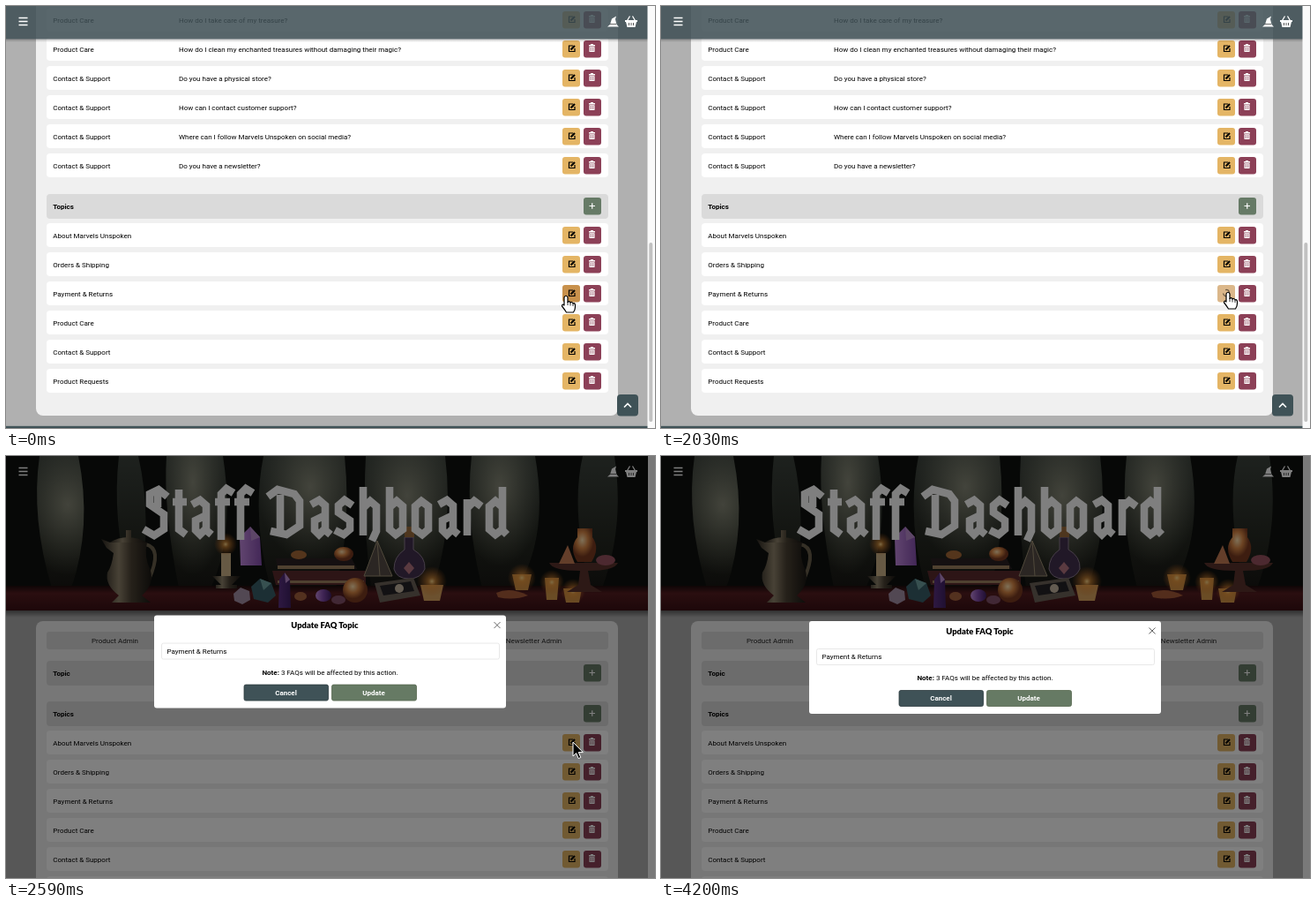
Animation, 736 px wide and 478 px high, one loop 4970 ms. Source, as an HTML page:

```html
<!DOCTYPE html>
<html lang="en">
<head>
<meta charset="utf-8">
<title>Staff Dashboard</title>
<style>
  html, body { margin: 0; height: 100%; overflow: hidden; background: #b0b0b0; }
  svg { display: block; width: 736px; height: 478px; font: 8px Roboto, sans-serif; }
  .b { font-weight: 700; }
  .mid { text-anchor: middle; }
  .title { fill: none; stroke: #fff; stroke-width: 8.6; stroke-miterlimit: 3; }
</style>
</head>
<body>
<svg viewBox="0 0 736 478">
  <defs>
    <radialGradient id="haze"><stop stop-color="#a3a48f" stop-opacity=".75"/><stop offset="1" stop-color="#8b8e7c" stop-opacity="0"/></radialGradient>
    <radialGradient id="flame"><stop stop-color="#ffd98a"/><stop offset=".25" stop-color="#f09a3c" stop-opacity=".7"/><stop offset="1" stop-color="#d06a20" stop-opacity="0"/></radialGradient>
    <radialGradient id="amber" cx=".4" cy=".35"><stop stop-color="#ffe2b0"/><stop offset=".5" stop-color="#d98745"/><stop offset="1" stop-color="#7a3a20"/></radialGradient>
    <linearGradient id="violet"><stop stop-color="#c48be0"/><stop offset=".5" stop-color="#7d46a8"/><stop offset="1" stop-color="#3f2063"/></linearGradient>
    <linearGradient id="brass"><stop stop-color="#2c2720"/><stop offset=".35" stop-color="#91846c"/><stop offset=".6" stop-color="#4b4234"/><stop offset="1" stop-color="#1c1814"/></linearGradient>
    <linearGradient id="wood" x2="0" y2="1"><stop stop-color="#1d0b0c"/><stop offset=".3" stop-color="#551d20"/><stop offset="1" stop-color="#3a0f14"/></linearGradient>
    <linearGradient id="forest" x2="0" y2="1"><stop stop-color="#3c433d"/><stop offset=".6" stop-color="#23261f"/><stop offset="1" stop-color="#120f0e"/></linearGradient>
    <linearGradient id="shade" x2="0" y2="1"><stop stop-opacity=".45"/><stop offset="1" stop-opacity="0"/></linearGradient>
    <clipPath id="bannerClip"><path d="M0 0H728V175H0Z"/></clipPath>
  </defs>

  <g id="list"></g>

  <g id="dash">
    <path fill="#b0b0b0" d="M0 0H728V478H0Z"/>
    <path fill="#f4f4f4" d="M728 0H736V478H728Z"/>
    <path fill="url(#shade)" d="M0 175H728V183H0Z"/>
    <g clip-path="url(#bannerClip)">
      <path fill="url(#forest)" d="M0 0H728V175H0Z"/>
      <g fill="url(#haze)">
        <ellipse cx="212" cy="30" rx="42" ry="105"/><ellipse cx="345" cy="35" rx="60" ry="85"/>
        <ellipse cx="455" cy="45" rx="60" ry="90"/><ellipse cx="560" cy="35" rx="50" ry="90"/><ellipse cx="70" cy="55" rx="60" ry="80"/>
      </g>
      <g fill="#0e110e">
        <path d="M0 0H38Q28 70 52 150H0ZM82 0H128Q120 70 140 150H74Q98 80 82 0ZM150 0H182Q178 60 196 150H152Q166 70 150 0Z"/>
        <path d="M246 0H292Q278 70 300 150H232Q260 90 246 0ZM384 0H408Q404 70 414 150H374Q392 80 384 0Z"/>
        <path d="M498 0H528Q520 70 540 150H484Q508 80 498 0ZM600 0H654Q640 60 662 150H580Q616 90 600 0ZM690 0H728V150H676Q702 80 690 0Z"/>
      </g>
      <path fill="url(#wood)" d="M0 147H728V175H0Z"/>
      <!-- pitcher -->
      <path fill="none" stroke="#6b604c" stroke-width="4" d="M158 100Q178 104 162 140"/>
      <path fill="url(#brass)" d="M118 98L108 94 114 104 122 110Q120 125 115 132Q112 146 128 158L120 166H164L154 158Q168 146 164 130Q156 114 160 98Z"/>
      <path fill="url(#brass)" d="M117 98Q138 86 160 98ZM136 84H142V94H136Z"/>
      <!-- candles -->
      <path fill="#cdb489" d="M244 110H255V138H244Z"/><path fill="url(#brass)" d="M234 136H266L256 146H262V150H238V146H244Z"/>
      <path fill="#d9a45e" d="M470 146H496L492 164H474Z"/>
      <path fill="#d59a4a" d="M574 134H596L592 152H578ZM611 138H627L625 163H613ZM632 150H653L650 166H635Z"/>
      <g fill="url(#flame)"><circle cx="249" cy="100" r="13"/><circle cx="483" cy="142" r="17"/><circle cx="585" cy="138" r="16"/><circle cx="619" cy="143" r="14"/><circle cx="643" cy="153" r="14"/></g>
      <!-- books and gems -->
      <path fill="#2b2023" d="M306 116H392L398 128H308Z"/><path fill="#5b2b2c" d="M302 130H408V146H306Z"/><path fill="#a08460" d="M308 124H395V128H308ZM308 141H406V144H308Z"/>
      <ellipse cx="383" cy="111" rx="11" ry="8" fill="url(#amber)"/><ellipse cx="332" cy="112" rx="9" ry="5" fill="#aa6a38"/>
      <path fill="url(#violet)" d="M265 92L277 80 288 92 290 124H266ZM310 140L316 132 322 140 323 172H309Z"/>
      <path fill="#bc8ecf" d="M277 80L288 92 278 96ZM316 132L322 140 317 144Z"/>
      <path fill="#385f68" d="M278 148L288 139 301 144 306 158 297 166 281 162Z"/><path fill="#6fa2a1" d="M288 139L301 144 292 152Z"/>
      <path fill="#a691a8" d="M258 156L266 149 276 153 277 163 268 168 259 164Z"/>
      <circle cx="396" cy="152" r="14" fill="url(#amber)"/>
      <ellipse cx="360" cy="158" rx="9" ry="7" fill="url(#violet)"/><ellipse cx="334" cy="159" rx="7" ry="5" fill="#a8633e"/><ellipse cx="377" cy="163" rx="8" ry="5" fill="#83516a"/>
      <!-- pyramid, potion, box -->
      <path fill="#574d46" stroke="#a09276" d="M421 96L438 136H406ZM421 96L424 136"/>
      <path fill="#43304f" stroke="#8d7c90" d="M452 92H462V106Q476 114 475 128Q470 139 457 139Q443 139 440 128Q440 114 452 106Z"/>
      <path fill="#9e6d3c" d="M452 80H463V92H452Z"/><path fill="#b57480" d="M457 120L463 127 457 134 451 127Z"/>
      <path fill="#6d6258" d="M418 144L462 138 470 158 424 166Z"/><path fill="#252326" d="M424 147L459 142 463 153 428 158Z"/><circle cx="446" cy="150" r="5" fill="#c8b8a3"/>
      <!-- cake stand -->
      <path fill="#5a322c" d="M616 121H694Q690 130 660 130L663 146 676 154H636L649 146 651 130Q620 130 616 121Z"/>
      <path fill="url(#amber)" d="M648 82H665V92Q674 104 664 120H648Q638 104 648 92Z"/>
      <path fill="#c77d55" d="M627 122L637 101 645 122Z"/><ellipse cx="680" cy="118" rx="11" ry="6" fill="#9a5360"/>
      <path fill="#a85a39" d="M556 155Q572 148 592 158Q576 164 558 160Z"/>
    </g>
    <g id="title" class="title" role="img" aria-label="Staff Dashboard"></g>
    <g id="panel"></g>
  </g>

  <path id="backdrop" d="M0 0H736V478H0Z"/>

  <g id="modal">
    <rect x="168" y="187" width="399" height="105" rx="3" fill="#fff"/>
    <text class="mid" x="361.5" y="201.5" font-family="Lato, sans-serif" font-weight="900" font-size="9.4">Update FAQ Topic</text>
    <path d="M553.5 194.500l7 7m0-7l-7 7" stroke="#666"/>
    <rect x="176.500" y="218.500" width="383" height="18" rx="2" fill="#fff" stroke="#e8e8e8"/>
    <text x="182.500" y="230">Payment &amp; Returns</text>
    <text class="mid" x="367.500" y="254"><tspan class="b">Note:</tspan> 3 FAQs will be affected by this action.</text>
    <g stroke-width=".8">
      <rect x="270" y="265.500" width="95.500" height="18" rx="2" fill="#3f5257" stroke="#2c3a3e"/>
      <rect x="369.500" y="265.500" width="96" height="18" rx="2" fill="#667a64" stroke="#56684f"/>
    </g>
    <g class="b mid" fill="#fff"><text x="317.500" y="277.200">Cancel</text><text x="417" y="277.200">Update</text></g>
  </g>

  <g id="status" font-family="Liberation Sans, Arial, sans-serif" font-size="13">
    <path d="M-1 458.500H240Q243 458.500 243 461.500V479H-1Z" fill="#cfe0fa" stroke="#a9bad6"/>
    <text id="link" x="5" y="472.500" fill="#42474f"></text>
  </g>

  <g id="cursor">
    <g id="hand" fill="#fff" stroke="#000" stroke-width="1.2" stroke-linejoin="round">
      <path d="M-2 2Q0-1.500 2 2V7.500Q4 5.500 5 8Q7 6.500 8 9Q10 8 10.500 10.500V13Q10.500 16 8.500 19H.5Q-2 15-4.500 12Q-4.500 9-2 11Z"/>
      <path fill="none" stroke-width=".8" d="M2 7V11M5 8V11.500M8 9V12"/>
    </g>
    <path id="arrow" stroke="#fff" d="M0 0V16L3.700 12.600 6.200 18.600 8.800 17.500 6.300 11.600H11.300Z"/>
  </g>
</svg>

<script>
const $ = id => document.getElementById(id);
const esc = s => s.replace(/&/g, '&amp;');
const rect = (x, y, w, h, fill, r = 3) =>
  `<rect x="${x}" y="${y}" width="${w}" height="${h}" rx="${r}" fill="${fill}"/>`;
const text = (x, y, s, more = '') => `<text x="${x}" y="${y + 2.9}" ${more}>${esc(s)}</text>`;
const YELLOW = '#e4b565', HOVER = '#c8914c', GREEN = '#667a66', SLATE = '#3f5257';

const pen = `<path d="M643 45H638.500V51.500H645V48" fill="none" stroke="#000" stroke-width="1.200"/>
  <path d="M640.500 49.500L645 45" stroke="#000" stroke-width="2.200"/>`;
const bin = `<path d="M661 44H668V45.500H661ZM663 43H666V44H663ZM661.500 46.200H667.500V52H661.500Z" fill="#fff"/>
  <path d="M663.300 47V51M665.700 47V51" stroke="#8c4057" stroke-width=".8"/>`;

// Icons are drawn for a row centred on y = 49.
function row(y, topic, question = '', id = '') {
  return rect(46, y - 14, 637, 27, '#fff', 4) + text(53.3, y, topic) + text(196, y, question) +
    `<g ${id && `id="${id}"`}>${rect(631, y - 10, 20, 19.5, YELLOW)}<g class="pen" transform="translate(0 ${y - 49})">${pen}</g></g>` +
    rect(655, y - 10, 20, 19.5, '#8c4057') + `<g transform="translate(0 ${y - 49})">${bin}</g>`;
}

function heading(y, label, extra = '') {
  return rect(46, y - 14, 637, 28, '#dadada', 4) + text(53.3, y, label, 'class="b"') + text(243, y, extra, 'class="b"') +
    rect(655, y - 10, 20, 19.5, GREEN) +
    `<path d="M661.500 ${y - .5}h6.500m-3.250-3.250v6.500" stroke="#fff" stroke-width="1.200"/>`;
}

const topics = ['About Marvels Unspoken', 'Orders & Shipping', 'Payment & Returns',
  'Product Care', 'Contact & Support', 'Product Requests'];
const topicList = (y, page) => heading(y, 'Topics') +
  topics.map((name, i) => row(y + 33 * (i + 1), name, '', page + i)).join('');

const nav = `<path d="M14.500 13.500H24.500M14.500 17.500H24.500M14.500 21.500H24.500" stroke="#fff" stroke-width="1.500"/>
  <path d="M682 23.500L685 21 687 14.500 692 11.500 691 15 692.500 21 695 23.500Z" fill="#fff"/>
  <path d="M685 20.500H692" stroke="#444" stroke-width=".8"/>
  <path d="M702 16H716V18H715L713.500 24H704.500L703 18H702Z" fill="#fff"/>
  <path d="M704.500 16.500L707.500 11.500M713.500 16.500L710.500 11.500" stroke="#fff" stroke-width="1.300"/>
  <path d="M706.500 19V22M709 19V22M711.500 19V22" stroke="#444" stroke-width=".9"/>`;

const questions = [
  ['Product Care', 'How do I take care of my treasure?'],
  ['Product Care', 'How do I clean my enchanted treasures without damaging their magic?'],
  ['Contact & Support', 'Do you have a physical store?'],
  ['Contact & Support', 'How can I contact customer support?'],
  ['Contact & Support', 'Where can I follow Marvels Unspoken on social media?'],
  ['Contact & Support', 'Do you have a newsletter?']
];

$('list').innerHTML = rect(0, 0, 736, 478, '#b0b0b0', 0) + rect(34, -20, 660, 484, '#f0f0f0', 8) +
  questions.map(([topic, q], i) => row(16 + 33 * i, topic, q)).join('') + topicList(227, 'a') +
  `<g id="spinner"><circle cx="641" cy="325" r="3.500" fill="none" stroke="#6d5b45" stroke-width="1.200" stroke-dasharray="16.500 5.500"/></g>` +
  rect(0, 0, 728, 37.5, 'rgba(62,79,84,.86)', 0) + `<path d="M0 37.500H728V41H0Z" fill="url(#shade)" opacity=".5"/>` + nav +
  rect(0, 475.8, 728, 3, SLATE, 0) + rect(727.5, 0, 9, 478, '#fafafa', 0) + rect(729.3, 268, 4, 203, '#c1c1c1', 2) +
  rect(693, 440, 24, 24.5, SLATE, 4) +
  `<path d="M701 454.500L705 450.500 709 454.500" fill="none" stroke="#fff" stroke-width="1.600"/>`;

const tabs = [['Product Admin', 46, 157], ['FAQ Admin', 205, 143], ['Message Admin', 351, 162], ['Newsletter Admin', 516, 167]];
$('panel').innerHTML = rect(34, 187, 660, 320, '#f0f0f0', 8) +
  tabs.map(([name, x, w], i) => rect(x, 199, w, 20, i == 1 ? '#464a49' : '#dadada') +
    text(x + w / 2 - 1, 209, name, `class="mid" fill="${i == 1 ? '#fff' : '#222'}"`)).join('') +
  heading(246, 'Topic', 'Question') + topicList(292, 'b') + nav;

// Blackletter strokes: advance width and path, baseline at 0.
const glyphs = {
  S: [33, 'M28-46L18-54 8-49V-37L24-26V-9L13-2 1-9M17-52V-34'],
  t: [20, 'M8-54V-9L16-3M1-40H17'],
  a: [28, 'M3-37L12-42 19-36V-8L25-3M19-25L7-19V-8L12-3 19-10'],
  f: [22, 'M8 3V-49L14-55 22-50M1-40H18'],
  ' ': [16, ''],
  D: [47, 'M1-46L12-54 31-49 37-41V-13L22-3 4-7M15-48V-6'],
  s: [28, 'M22-36L13-42 6-36V-28L19-19V-9L12-3 2-8'],
  h: [30, 'M6-57V-2M6-33L14-41 21-35V-7L16 4'],
  b: [30, 'M6-57V-9L13-3 21-9V-35L14-41 6-34'],
  o: [29, 'M5-35L12-41 20-35V-9L13-3 5-9Z'],
  r: [27, 'M7-43V-2M7-33L15-41 23-35'],
  d: [27, 'M20-57V-8L25-3M20-34L12-41 5-35V-9L12-3 20-9']
};
let penX = 155;
for (const c of 'Staff Dashboard') {
  const [width, d] = glyphs[c];
  $('title').innerHTML += `<path transform="translate(${penX} 92)" d="${d}"/>`;
  penX += width;
}

const ramp = (t, a, b) => Math.min(1, Math.max(0, (t - a) / (b - a)));
const show = (id, on) => $(id).style.display = on ? '' : 'none';
const route = [[70, 635, 328], [560, 643, 324], [2940, 643, 324], [3220, 517, 382],
  [3640, 452, 432], [4060, 452, 432], [4200, 440, 500]];

function place(t) {
  let [, x, y] = route[0];
  for (let i = 1; i < route.length; i++) {
    const [t0, x0, y0] = route[i - 1], [t1, x1, y1] = route[i], k = ramp(t, t0, t1);
    if (t >= t0) { x = x0 + (x1 - x0) * k; y = y0 + (y1 - y0) * k; }
  }
  return `translate(${x} ${y})`;
}

const LOOP = 4970, CLICK = 1610, LOAD = 2170, OPEN = 2390;
const payButton = $('a2'), aboutButton = $('b0');

function draw(now) {
  const t = now % LOOP, loaded = t >= LOAD, busy = t >= CLICK;
  show('list', !loaded);
  show('dash', loaded);
  show('hand', !loaded);
  show('arrow', loaded);
  show('spinner', busy);
  $('spinner').setAttribute('transform', `rotate(${t * .48} 641 325)`);
  payButton.firstChild.setAttribute('fill', HOVER);
  payButton.style.opacity = busy ? .65 : 1;
  payButton.querySelector('.pen').style.opacity = busy ? 0 : 1;
  aboutButton.firstChild.setAttribute('fill', t < OPEN ? HOVER : YELLOW);

  $('backdrop').style.opacity = .5 * ramp(t, 2250, 2400);
  $('modal').style.opacity = ramp(t, OPEN, OPEN + 150);
  const slide = -50 * (1 - ramp(t, OPEN, OPEN + 300)) ** 1.85;
  $('modal').setAttribute('transform', `translate(0 ${slide})`);

  $('link').textContent = `...myapp.example/staff/.../${loaded ? 1 : 3}/`;
  $('status').style.opacity = loaded
    ? ramp(t, LOAD, 2345) - ramp(t, 2400, 2540)
    : ramp(t, 350, 490) - ramp(t, CLICK, CLICK + 140);
  $('cursor').setAttribute('transform', place(t));
  requestAnimationFrame(draw);
}
draw(0);
</script>
</body>
</html>
```
